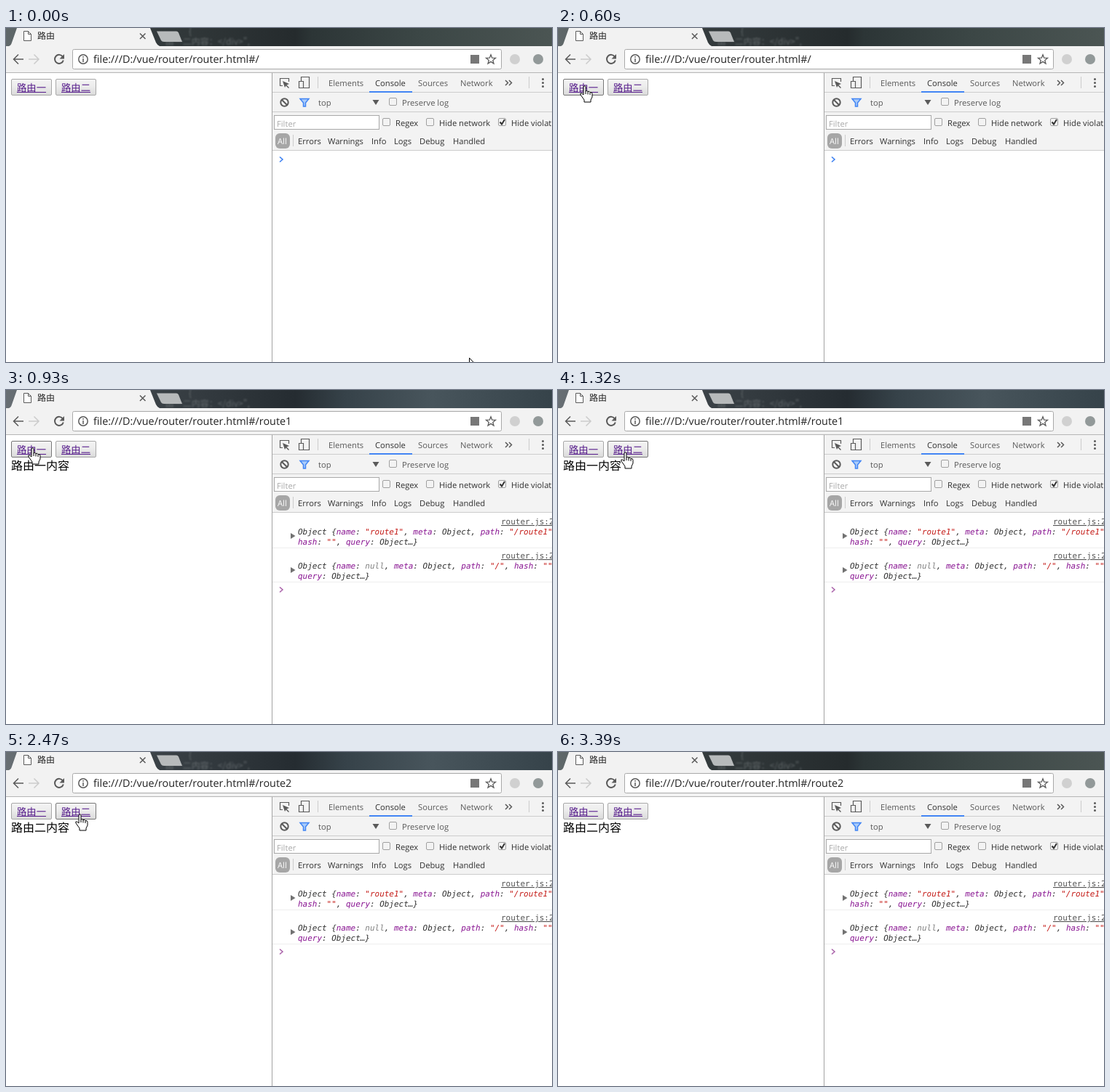
Recreate the animation shown at these times as an HTML page. Size 750x460 px, loop 3.49 s.

```html
<!DOCTYPE html>
<html lang="zh">
<head>
<meta charset="utf-8">
<title>路由</title>
<style>
  html, body { margin: 0; width: 100%; height: 100%; overflow: hidden; background: #fff; }
  svg { display: block; }
  text { white-space: pre; text-rendering: geometricPrecision; }
  .ui { font: 11.2px "Open Sans", "Noto Sans", sans-serif; fill: #303030; }
  .dim { fill: #5a5a5a; }
  .cjk { font-family: "Noto Sans CJK SC", "Noto Sans CJK", sans-serif; }
  .log { font: italic 10.96px "DejaVu Sans Mono", monospace; fill: #303030; }
  .log .link { font-style: normal; fill: #545454; text-decoration: underline; }
  .key { fill: #881391; }
  .str { fill: #c41a16; }
  .nil { fill: #808080; }
  .icon { fill: none; stroke: #5a5a5a; stroke-width: 1.5; }
  .rule { fill: none; stroke: #ccc; }
</style>
</head>
<body>
<svg width="750" height="460" viewBox="0 0 750 460">
  <defs>
    <linearGradient id="green">
      <stop offset="0" stop-color="#60686a"/><stop offset=".28" stop-color="#333a3c"/>
      <stop offset=".53" stop-color="#252b2d"/><stop offset=".56" stop-color="#2c3536"/>
      <stop offset=".75" stop-color="#3b4645"/><stop offset="1" stop-color="#4b5553"/>
    </linearGradient>
    <linearGradient id="blue">
      <stop offset="0" stop-color="#686f74"/><stop offset=".28" stop-color="#3a4146"/>
      <stop offset=".53" stop-color="#252c31"/><stop offset=".62" stop-color="#364249"/>
      <stop offset=".78" stop-color="#48555c"/><stop offset="1" stop-color="#36434a"/>
    </linearGradient>
    <linearGradient id="face" x2="0" y2="1">
      <stop offset="0" stop-color="#f4f4f4"/><stop offset=".45" stop-color="#ececec"/>
      <stop offset="1" stop-color="#dadada"/>
    </linearGradient>
    <linearGradient id="pressed" x2="0" y2="1">
      <stop offset="0" stop-color="#dcdcdc"/><stop offset="1" stop-color="#f1f1f1"/>
    </linearGradient>
    <filter id="blur"><feGaussianBlur stdDeviation="1"/></filter>
  </defs>

  <!-- tab strip -->
  <rect id="strip" width="750" height="25"/>
  <g class="cjk" font-size="12" fill="#858b8d" opacity=".6" filter="url(#blur)">
    <text x="251" y="9">{</text><text x="213" y="23">"由一二内容：&lt;/div&gt;",</text>
  </g>
  <path d="M4 25Q7 24 8 20L15 0H198L206 20Q208 24 211 25Z" fill="#f2f2f2"/>
  <path d="M207 4.5H234Q236 4.5 237 6.500L242 19H217Q214 19 213 17Z" fill="#b7babb"/>
  <path d="M24.500 4.500H30.500L34.500 8.500V17.500H24.500ZM30.500 4.500V8.500H34.500" fill="#fff" stroke="#5a5a5a"/>
  <text class="cjk" x="43" y="15" font-size="12" fill="#222">路由</text>
  <path class="icon" d="M184 7.500L191.500 15M191.500 7.500L184 15"/>

  <!-- address bar -->
  <path d="M0 25H750V61H0Z" fill="#f2f2f2"/>
  <path d="M0 61.500H750" stroke="#b5b5b5"/>
  <path class="icon" stroke-width="2" d="M24 43H11M17 36.500L10.500 43L17 49.500"/>
  <path class="icon" style="stroke:#ccc" d="M31 43H45M38.500 36.500L45 43L38.500 49.500"/>
  <path class="icon" d="M78 39.500A6 6 0 1 0 78.800 44.500" style="stroke-width:2"/>
  <path d="M80 36V42.500H73.500Z" fill="#5a5a5a"/>
  <rect x="91.500" y="29.500" width="589" height="27" rx="2" fill="#fff" stroke="#a9a9a9"/>
  <circle class="icon" cx="106" cy="43" r="6.200"/>
  <path class="icon" d="M106 39V40.800M106 42V47"/>
  <text id="url" x="120" y="48" font-family="Open Sans, Noto Sans, sans-serif" font-size="14.400" fill="#222"></text>
  <rect x="638" y="37" width="12" height="12" fill="#777"/>
  <path class="icon" style="stroke-width:1.300" id="star"/>
  <circle cx="699" cy="43" r="7" fill="#d0d0d0"/>
  <circle cx="731" cy="43" r="7" fill="#929999"/>

  <!-- page -->
  <g id="buttons"></g>
  <text class="cjk" id="content" x="7" y="110" font-size="16"></text>

  <!-- developer tools -->
  <path d="M366 62H750V168H366Z" fill="#f3f3f3"/>
  <path d="M365.500 62V460" stroke="#a3a3a3"/>
  <path class="rule" d="M366 88.500H750M366 115.500H750M366 168.500H750M428.500 67V83M718.500 67V83M394.500 147V163"/>
  <path d="M499 87H558V89H499Z" fill="#4285f4"/>
  <path class="icon" style="stroke-width:1.200" d="M380 79.500H376.500V69.500H388.500V74"/>
  <path d="M380 73L389 77L385.500 78.500L389 82L388 83L384.500 79.500L383 82Z" fill="#5a5a5a"/>
  <path class="icon" style="stroke-width:1.200" d="M405.500 73V67.500H416.500V82.500H408M402.500 73.500H408.500V82.500H402.500Z"/>
  <path class="icon" d="M686 72L689.500 75.500L686 79M691 72L694.500 75.500L691 79"/>
  <g fill="#5a5a5a">
    <circle cx="737.500" cy="70.500" r="1.500"/><circle cx="737.500" cy="75.500" r="1.500"/><circle cx="737.500" cy="80.500" r="1.500"/>
    <path d="M503.500 99H512.500L508 106Z"/>
  </g>
  <circle class="icon" style="stroke-width:2" cx="382.500" cy="102.500" r="5.200"/>
  <path class="icon" style="stroke-width:2" d="M379 99L386 106"/>
  <path d="M404 97.500H416L411.500 103V108H408.500V103Z" fill="#a9cbfa" stroke="#4285f4" stroke-width="1.500"/>
  <rect x="368.500" y="120.500" width="144" height="19" fill="#fff" stroke="#a9a9a9"/>
  <rect x="370" y="145" width="20" height="21" rx="6" fill="#a6a6a6"/>
  <g id="labels"></g>

  <g id="output" class="log">
    <path class="rule" style="stroke:#eee" d="M366 217.500H750M366 264.500H750"/>
    <path d="M391 197V205L397.500 201ZM391 244V252L397.500 248Z" fill="#727272"/>
    <text class="link" x="680" y="185">router.js:24</text>
    <text x="401" y="199">Object {<tspan class="key">name</tspan>: <tspan class="str">"route1"</tspan>, <tspan class="key">meta</tspan>: Object, <tspan class="key">path</tspan>: <tspan class="str">"/route1"</tspan>,</text>
    <text x="401" y="213"><tspan class="key">hash</tspan>: <tspan class="str">""</tspan>, <tspan class="key">query</tspan>: Object…}</text>
    <text class="link" x="680" y="232">router.js:24</text>
    <text x="401" y="246">Object {<tspan class="key">name</tspan>: <tspan class="nil">null</tspan>, <tspan class="key">meta</tspan>: Object, <tspan class="key">path</tspan>: <tspan class="str">"/"</tspan>, <tspan class="key">hash</tspan>: <tspan class="str">""</tspan>,</text>
    <text x="401" y="260"><tspan class="key">query</tspan>: Object…}</text>
  </g>
  <path id="prompt" fill="none" stroke-width="1.500" d="M376 177.500L380 181L376 184.500"/>

  <path id="cursor" fill="#fff" stroke="#000"/>
</svg>
<script>
const LOOP = 3490;
const PRESS = [[770, 930], [1690, 1850]];
const ARROW = 'M.5 .5V16L4 12.500L6.500 18.500L9 17.500L6.500 11.800H11.500Z';
const HAND = 'M-1 1Q0 -1 1.500 0Q2 .5 2 2V7Q3.500 5.500 5 7.500Q7 6.500 8 8.500Q11 8 11 10.500V15L9 19V22H0V19L-5 12Q-6 9 -3.500 10L-1 12ZM2 7V11M5 7.500V11.500M8 8.500V12';

// Pointer poses: start time, x, y; each holds until the next.
const POSES = [
  [0, 636, 454], [70, 590, 430], [140, 425, 343], [220, 205, 226], [300, 74, 157],
  [390, 50, 115], [460, 42, 91], [530, 39, 83], [600, 36, 80],
  [1150, 44, 82], [1240, 74, 85], [1320, 92, 86], [1380, 95, 86], [1460, 97, 86],
  [2470, 101, 86], [2550, 125, 103], [2630, 205, 155], [2710, 340, 240],
  [2790, 490, 330], [2860, 620, 404], [2940, 698, 438], [3030, 800, 480]
];

const $ = id => document.getElementById(id);
function add(parent, tag, attrs, text = '') {
  const node = document.createElementNS('http://www.w3.org/2000/svg', tag);
  for (const name in attrs) node.setAttribute(name, attrs[name]);
  node.textContent = text;
  return parent.appendChild(node);
}

const rows = [
  [80, 'ui dim', { 443: 'Elements', 566: 'Sources', 624: 'Network' }],
  [80, 'ui', { 507: 'Console' }],
  [107, 'ui dim', { 429: 'top', 544: 'Preserve log' }],
  [135, 'ui', { 535: 'Regex', 595: 'Hide network', 694: 'Hide violations' }],
  [160, 'ui', { 401: 'Errors', 442: 'Warnings', 502: 'Info', 533: 'Logs', 568: 'Debug', 614: 'Handled' }]
];
for (const [y, style, items] of rows)
  for (const x in items) add($('labels'), 'text', { x, y, class: style }, items[x]);
add($('labels'), 'text', { x: 372, y: 136, class: 'ui', style: 'fill:#a9a9a9' }, 'Filter');
add($('labels'), 'text', { x: 373, y: 160, class: 'ui', style: 'fill:#fff' }, 'All');

for (const [x, y] of [[526, 96], [517, 124], [577, 124], [676, 124]])
  add($('labels'), 'rect', { x: x + .5, y: y + .5, width: 10, height: 10, rx: 1.5, fill: '#f3f3f3', stroke: '#a0a0a0' });
add($('labels'), 'path', { d: 'M678.500 129.500L681 132.500L685 126', fill: 'none', stroke: '#333', 'stroke-width': 2 });

const starPoints = Array.from({ length: 10 }, (_, i) => {
  const radius = i % 2 ? 2.9 : 6.8, angle = i * Math.PI / 5;
  return [666 + radius * Math.sin(angle), 43.5 - radius * Math.cos(angle)];
});
$('star').setAttribute('d', `M${starPoints.join('L')}Z`);

const buttons = ['路由一', '路由二'].map((label, i) => {
  const x = 7 + 61 * i, group = $('buttons');
  return {
    x,
    box: add(group, 'rect', { x: x + .5, y: 70.5, width: 55, height: 22, rx: 1.5 }),
    text: add(group, 'text', { x: x + 8, y: 87, class: 'cjk', 'font-size': 13.33 }, label),
    line: add(group, 'path', { d: `M${x + 8} 88.500h40` })
  };
});

function render(t) {
  const [, x, y] = POSES.findLast(pose => pose[0] <= t);
  const route = PRESS.filter(([, release]) => t >= release).length;
  let overButton = false;

  buttons.forEach(({ x: left, box, text, line }, i) => {
    const hover = x >= left && x < left + 56 && y >= 70 && y < 93;
    const down = t >= PRESS[i][0] && t < PRESS[i][1];
    const ink = down ? '#e00' : '#551a8b';
    overButton ||= hover;
    box.setAttribute('fill', `url(#${down ? 'pressed' : 'face'})`);
    box.setAttribute('stroke', hover && !down ? '#777' : '#a8a8a8');
    text.setAttribute('fill', ink);
    line.setAttribute('stroke', ink);
  });

  $('strip').setAttribute('fill', `url(#${t >= 770 && t < 3390 ? 'blue' : 'green'})`);
  $('url').textContent = 'file:///D:/vue/router/router.html#/' + (route ? 'route' + route : '');
  $('content').textContent = ['', '路由一内容', '路由二内容'][route];
  $('output').setAttribute('visibility', route ? 'visible' : 'hidden');
  $('prompt').setAttribute('transform', `translate(0 ${route ? 94 : 0})`);
  $('prompt').setAttribute('stroke', route ? '#a860a8' : '#367cf1');
  $('cursor').setAttribute('d', overButton ? HAND : ARROW);
  $('cursor').setAttribute('transform', `translate(${x} ${y})`);
}

const start = performance.now();
function tick() {
  render((performance.now() - start) % LOOP);
  requestAnimationFrame(tick);
}
tick();
</script>
</body>
</html>
```
